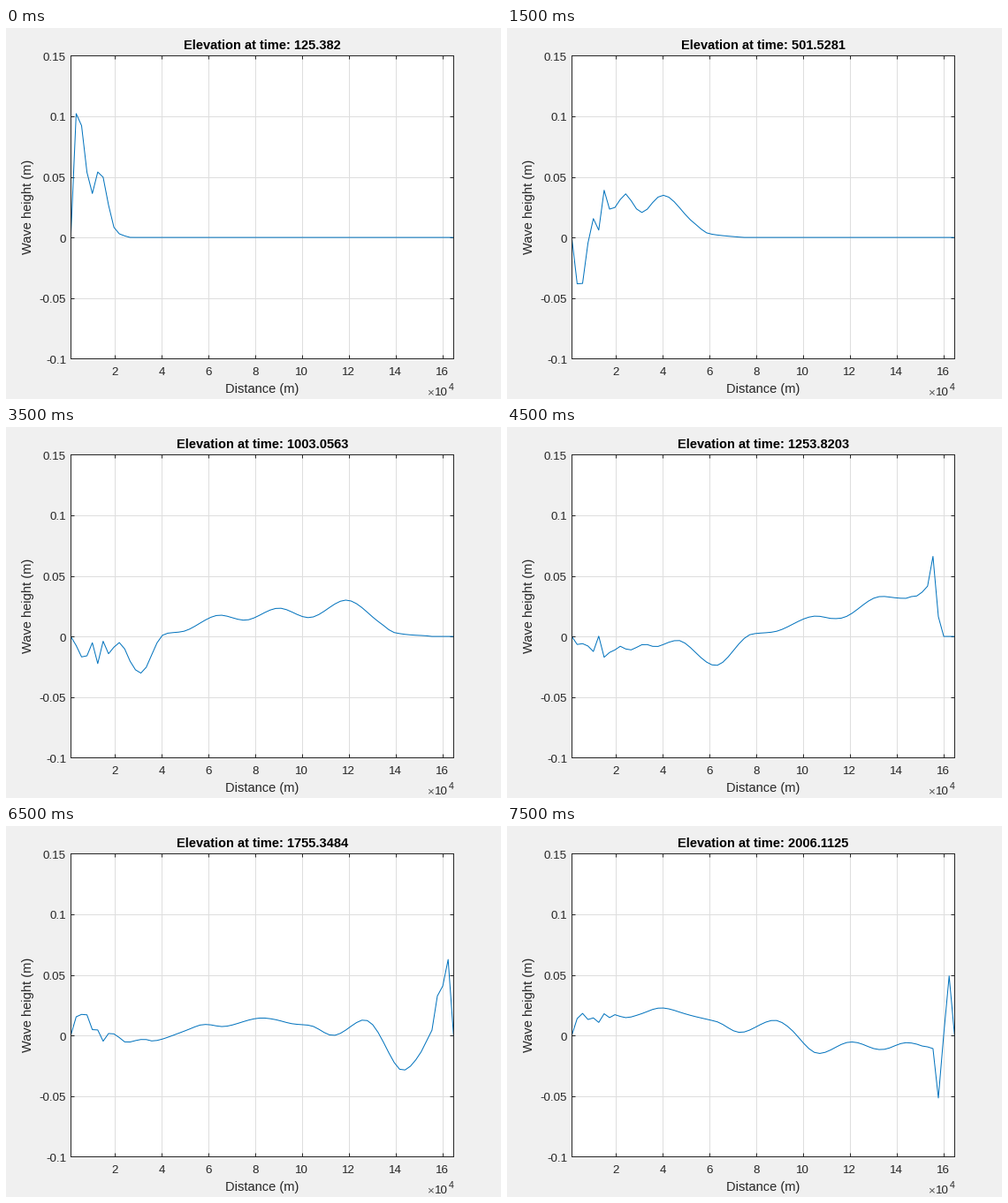
A matplotlib script that plays this animation: 560x420 px, repeating every 8000 ms.

```python
import numpy as np
import matplotlib
import matplotlib.pyplot as plt
from matplotlib.animation import FuncAnimation

matplotlib.rcParams["font.family"] = "Liberation Sans"

W, H, DPI = 560, 420, 96
LEFT, RIGHT, TOP, BOTTOM = 73.3, 506.3, 31.3, 374.3
N, DX = 72, 2305.0          # cells and cell size in metres
FRAMES, STEP = 16, 125.3820315
INK = "#262626"

cell = np.arange(N)
dist = (cell + 0.5) * DX


def smooth(knots, x):
    """Monotone cubic through (x, y) knots, held flat outside them."""
    xk, yk = np.array(knots, float).T
    x = np.clip(x, xk[0], xk[-1])
    dx = np.diff(xk)
    s = np.diff(yk) / dx
    same = s[:-1] * s[1:] > 0
    total = np.where(same, s[:-1] + s[1:], 1)
    m = np.concatenate([s[:1], np.where(same, 2 * s[:-1] * s[1:] / total, 0), s[-1:]])
    j = np.clip(np.searchsorted(xk, x, "right") - 1, 0, len(dx) - 1)
    t = (x - xk[j]) / dx[j]
    return (yk[j] * (1 + 2 * t) * (1 - t) ** 2 + yk[j + 1] * t * t * (3 - 2 * t)
            + dx[j] * t * (1 - t) * (m[j] * (1 - t) - m[j + 1] * t))


# Travel time to each cell, in steps: slow shelves around a deep basin.
travel = smooth([(0, -4.7), (2, -3.8), (5, -2.4), (10, -0.65), (13, 0), (17, 0.72),
                 (26.7, 2), (61.3, 6), (67, 6.8), (68, 7.7), (69, 8.7), (70, 10.3),
                 (71, 12)], cell)
# Waves grow where they slow down.
gain = np.sqrt(np.minimum(np.gradient(travel) / 0.118, 9))
# The returning wave starts at the edge of the far shelf.
shelf = np.clip((67 - cell) / 4, 0, 1)

# Crests and troughs (time, mm) of the outgoing and the reflected wave.
OUTGOING = [(0.4, 0), (1.15, 3), (1.5, 11.5), (2.23, 30.5), (3, 16), (3.61, 24),
            (4.34, 13.5), (4.87, 17.3), (5.75, 3.8), (6.2, 2), (7, -23.5),
            (7.9, -3), (8.5, -7), (8.9, -5), (9.4, -8), (10, -5), (10.75, -9),
            (11.4, -3), (12.3, -5), (12.9, -2.5), (13.5, -4), (14.3, 1), (15, -1),
            (16.7, 9), (18, 6), (18.8, 9), (19.6, 5)]
REFLECTED = [(13.4, 0), (14.3, 7), (15, 15), (16.3, 20), (17, 14), (17.5, 7),
             (18.25, 16.5), (19.15, -6.5), (19.8, 0), (20.4, -4), (21, -1), (22, -5)]


def wave(k):
    h = gain * (smooth(OUTGOING, k - travel) + shelf * smooth(REFLECTED, k + travel))
    # First push at the shore, then a fading zigzag from cell to cell.
    h += 75 * np.exp(-((cell - 1) / 1.5) ** 2 - 2 * k)
    zigzag = np.cos(np.pi * cell) * np.exp(-((cell - 5) / 2) ** 2)
    h += 16 * np.exp(-k / 9) * np.cos(np.pi * (k - 3) / 2) * zigzag
    h[[0, -1]] = 0
    return h / 1000


fig = plt.figure(figsize=(W / DPI, H / DPI), dpi=DPI, facecolor="#f0f0f0")
ax = fig.add_axes([LEFT / W, 1 - BOTTOM / H, (RIGHT - LEFT) / W, (BOTTOM - TOP) / H])
ax.set_xlim(dist[0], dist[-1])
ax.set_ylim(-0.1, 0.15)
xticks = np.arange(2, 17, 2)
yticks = np.arange(-2, 4) * 0.05
ax.set_xticks(xticks * 1e4)
ax.set_yticks(yticks)
ax.tick_params(direction="in", length=3.25, width=0.75, color=INK, top=True,
               right=True, labelbottom=False, labelleft=False)
ax.grid(color="#dedede", linewidth=0.75)
ax.set_axisbelow(True)
for spine in ax.spines.values():
    spine.set(color=INK, linewidth=0.75)


def put(x, y, text, size=10, ha="center", color=INK, **kw):
    return fig.text(x / W, 1 - y / H, text, fontsize=size, ha=ha,
                    va="baseline", color=color, **kw)


for v in xticks:
    x = LEFT + (RIGHT - LEFT) * (v * 1e4 - dist[0]) / (dist[-1] - dist[0])
    put(x, 393, str(v))
for v in yticks:
    put(68, TOP + (BOTTOM - TOP) * (0.15 - v) / 0.25 + 5.5, f"{v:.2g}", ha="right")
put(290, 413, "Distance (m)", 11)
put(32.5, 202, "Wave height (m)", 11, rotation=90).set(va="center", ha="right")
put(476, 416, "\u00d7", 10, "left", "#555555")
put(484.5, 416, "10", 10, "left")
put(501, 410, "4", 8, "left")
title = put(290, 24, "", 11, color="black", weight="bold")
line, = ax.plot([], [], color="#0072bd", linewidth=0.75, solid_joinstyle="round")


def draw(k):
    line.set_data(dist, wave(k))
    stamp = f"{STEP * (k + 1):.4f}".rstrip("0")
    title.set_text(f"Elevation at time: {stamp}")
    return line, title


anim = FuncAnimation(fig, draw, frames=FRAMES, interval=500, repeat=True,
                     repeat_delay=0, blit=False)
plt.show()
```
